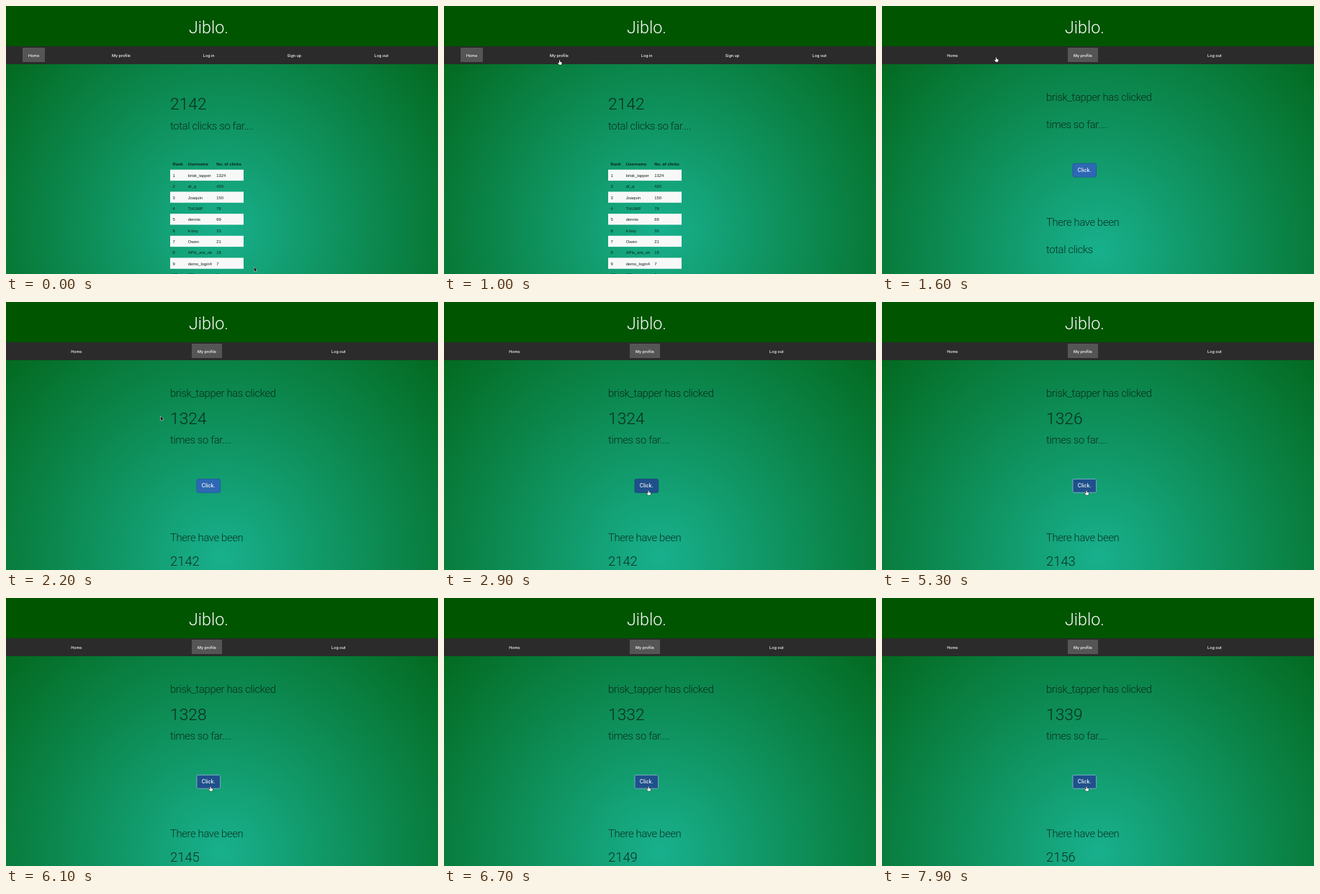
An HTML page with a canvas that plays this animation: 600x373 px, repeating every 8000 ms.

```html
<!DOCTYPE html>
<html lang="en">
<head>
<meta charset="utf-8">
<title>Click counter</title>
<style>
html, body { margin: 0; width: 100%; height: 100%; overflow: hidden; background: #005500; }
canvas { display: block; width: 600px; height: 373px; }
</style>
</head>
<body>
<canvas id="stage"></canvas>
<script>
const W = 600, H = 373, LOOP = 8000, STEP = 100;
const canvas = document.getElementById('stage');
const ctx = canvas.getContext('2d');
const dpr = window.devicePixelRatio || 1;
canvas.width = W * dpr;
canvas.height = H * dpr;

const SANS = '"Liberation Sans", Arial, sans-serif';
const LIGHT = 'Roboto, "Open Sans", sans-serif';
const MEDIUM = 'Inter, "Liberation Sans", sans-serif';
const BODY = '5.83px ' + SANS;
const BOLD = 'bold 5.83px ' + SANS;
const NAV = '500 5.4px ' + MEDIUM;
const BIG = '300 22.8px ' + LIGHT;
const TOTAL = '300 18.4px ' + LIGHT;
const MID = '300 14.8px ' + LIGHT;
const INK = '#0c2318';
const SOFT = 'rgba(8, 28, 20, 0.85)';

const PLAYER = 'brisk_tapper';
const RANKS = [
  [PLAYER, 1324], ['dr_q', 420], ['Joaquin', 150], ['THUMP', 78], ['dennis', 69],
  ['k-boy', 33], ['Owen', 21], ['APIs_are_ok', 18], ['demo_login4', 7], ['MK', 6]
];
const HOME_NAV = [['Home', 38.7], ['My profile', 160], ['Log in', 281.7], ['Sign up', 400.3], ['Log out', 521.3]];
const USER_NAV = [['Home', 97.8], ['My profile', 279], ['Log out', 461.8]];

// Pointer path: time, x, y of the tip
const PATH = [
  [0, 344.5, 363.5], [100, 343, 361], [500, 244, 205], [900, 163, 85], [1000, 160, 75.5],
  [1300, 158, 71.5], [1800, 158, 71.5], [2250, 222, 170], [2700, 283.5, 262.5], [8000, 283.5, 262.5]
];

function text(str, x, y, font, color = INK, align = 'left') {
  ctx.font = font;
  ctx.fillStyle = color;
  ctx.textAlign = align;
  ctx.fillText(str, x, y);
}

// Light headings are set slightly tight
function heading(str, y) {
  ctx.letterSpacing = '-0.35px';
  text(str, 228, y, MID, SOFT);
  ctx.letterSpacing = '0px';
}

function rect(x, y, w, h, color) {
  ctx.fillStyle = color;
  ctx.fillRect(x, y, w, h);
}

function backdrop(cy) {
  const g = ctx.createRadialGradient(W / 2, cy, 0, W / 2, cy, Math.hypot(W / 2, cy));
  g.addColorStop(0, '#18b08d');
  g.addColorStop(1, '#006010');
  rect(0, 0, W, H, g);
}

function header(nav, active) {
  rect(0, 0, W, 56, '#005500');
  rect(0, 56, W, 25, '#2b2b2b');
  text('Jiblo.', 254, 38.3, '300 23.3px ' + LIGHT, '#fff');
  for (const [label, x] of nav) {
    if (label === active) {
      ctx.font = NAV;
      const w = Math.round(ctx.measureText(label).width + 16);
      rect(Math.round(x - w / 2), 58, w, 20, '#555');
    }
    text(label, x, 70.6, NAV, '#fff', 'center');
  }
}

function homePage() {
  backdrop(312);
  header(HOME_NAV, 'Home');
  text('2142', 228, 144.2, BIG, SOFT);
  heading('total clicks so far....', 171.8);
  const cols = [231.5, 252.7, 292.3];
  ['Rank', 'Username', 'No. of clicks'].forEach((s, i) => text(s, cols[i], 222, BOLD));
  RANKS.forEach(([name, clicks], i) => {
    const y = 227.8 + i * 15.33;
    if (i % 2 === 0) rect(228, y, 102, 15.33, '#f8f8f8');
    [i + 1, name, clicks].forEach((s, c) => text(s, cols[c], y + 10.2, BODY));
  });
}

function button(y, hover, focus) {
  ctx.beginPath();
  ctx.roundRect(265, y - 0.4, 32.6, 18.8, 2);
  ctx.fillStyle = hover ? '#20508c' : '#2e68b4';
  ctx.fill();
  ctx.lineWidth = 0.9;
  ctx.strokeStyle = focus ? '#b4cdea' : hover ? '#194678' : '#2358a0';
  ctx.setLineDash(focus ? [1.6, 0.8] : []);
  ctx.stroke();
  ctx.setLineDash([]);
  text('Click.', 281.2, y + 11.6, '500 7px ' + MEDIUM, '#fff', 'center');
}

function clickCount(t) {
  if (t >= 6000) return 4 + Math.floor((t - 6000) / 170);
  return [3200, 4600, 5600].filter(at => t >= at).length;
}

function profilePage(t) {
  const loaded = t >= 1800;
  const drop = loaded ? 27.2 : 0;
  const n = clickCount(t);
  backdrop(loaded ? 354 : 340);
  header(USER_NAV, 'My profile');
  heading(PLAYER + ' has clicked', 132.2);
  if (loaded) text(1324 + n, 228, 169.7, BIG, SOFT);
  heading('times so far....', 170.2 + drop);
  button(219.6 + drop, t >= 2600, n > 0);
  heading('There have been', 306 + drop);
  if (loaded) text(2142 + Math.max(0, n - 1), 228, 367.3, TOTAL, SOFT);
  heading('total clicks', loaded ? 396 : 344.2);
}

function shape(points, x, y, fill, line) {
  ctx.beginPath();
  points.forEach(([px, py]) => ctx.lineTo(x + px, y + py));
  ctx.closePath();
  ctx.lineJoin = 'round';
  ctx.lineWidth = 0.9;
  ctx.strokeStyle = line;
  ctx.stroke();
  ctx.fillStyle = fill;
  ctx.fill();
}

const ARROW = [[0, 0], [0, 5.6], [1.3, 4.5], [2.2, 6.6], [3.1, 6.2], [2.3, 4.2], [4, 4.1]];
const HAND = [[0, 0], [1, 0], [1.2, 2.2], [3.4, 2.7], [3.6, 4.5], [2.9, 6.3], [0, 6.3], [-1.9, 3.8], [-1.3, 3.2], [0, 4]];

function pointer(t) {
  const i = PATH.findIndex(p => p[0] > t);
  const [t0, x0, y0] = PATH[i - 1], [t1, x1, y1] = PATH[i];
  const k = (t - t0) / (t1 - t0);
  const x = x0 + (x1 - x0) * k, y = y0 + (y1 - y0) * k;
  const onLink = (t >= 1000 && t <= 1800) || t >= 2600;
  if (onLink) shape(HAND, x, y, '#fff', '#111');
  else shape(ARROW, x, y, '#111', '#eee');
}

function frame(now) {
  const t = Math.floor((now % LOOP) / STEP) * STEP;
  ctx.setTransform(dpr, 0, 0, dpr, 0, 0);
  if (t < 1400) homePage();
  else profilePage(t);
  pointer(t);
  requestAnimationFrame(frame);
}
requestAnimationFrame(frame);
</script>
</body>
</html>
```
